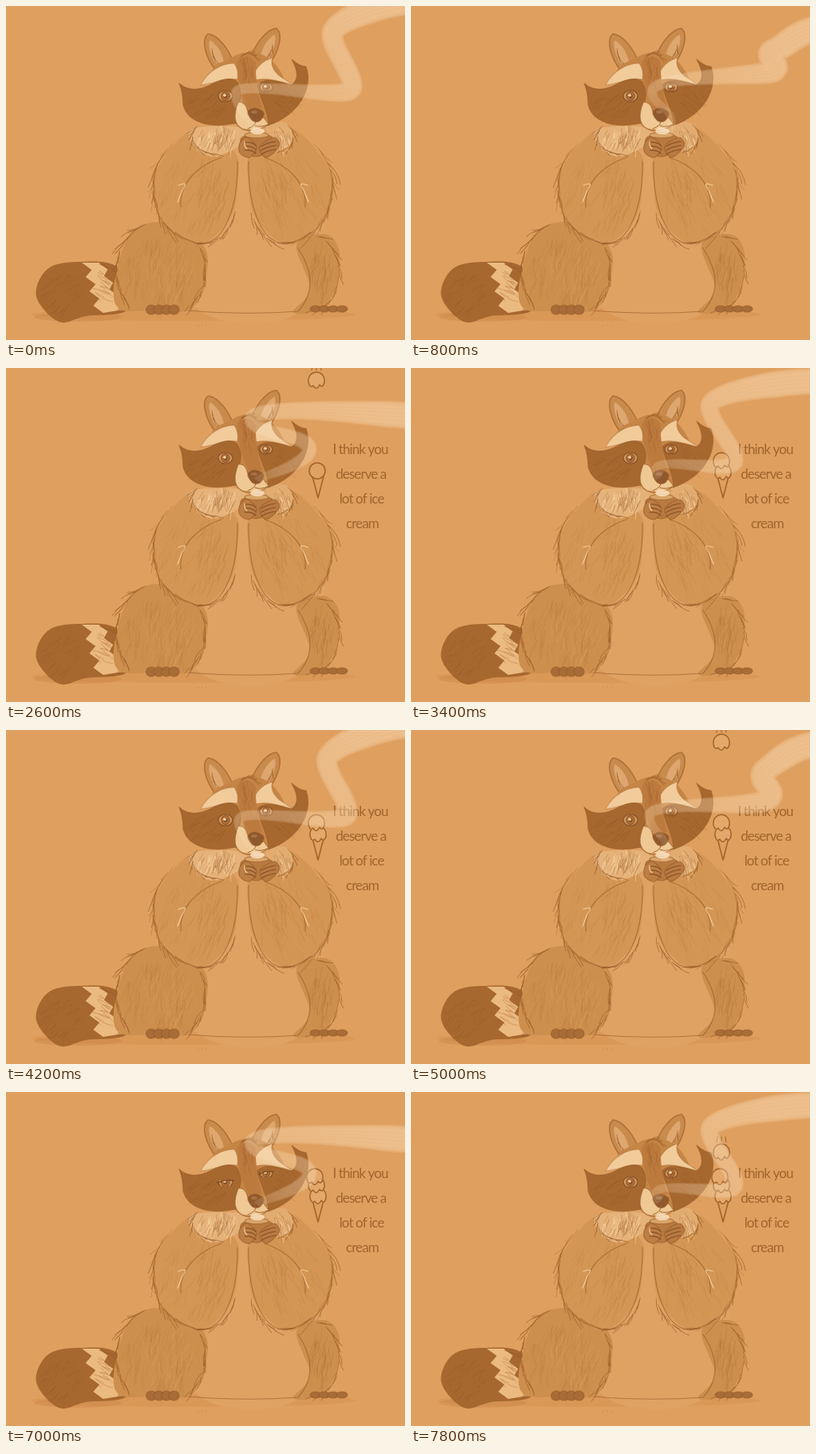
Animation of 500x419 px, one loop 8000 ms. Source, as an HTML page with a canvas:

```html
<!DOCTYPE html>
<html lang="en">
<head>
<meta charset="utf-8">
<title>Raccoon with a warm cup</title>
<style>
html, body { margin: 0; width: 100%; height: 100%; overflow: hidden; background: #df9f5e; }
canvas { display: block; width: 500px; height: 419px; }
</style>
</head>
<body>
<canvas id="stage" width="500" height="419"></canvas>
<script>
const stage = document.getElementById('stage');
const ctx = stage.getContext('2d');
const BG = '#df9f5e', INK = '#a1652d', LINE = 'rgba(154,92,40,.65)', SOFT = 'rgba(154,92,40,.35)';
const DARK = '#a7682f', PALE = '#f1cb9a', ARM = '#d49654', LEG = '#cd8f4d', BELLY = '#dfa263';
const STEP = 200, LOOP = 8000, CYCLE = 22;

let seed = 7;
const rnd = () => (seed = (seed * 16807) % 2147483647) / 2147483647;
const spread = r => (rnd() * 2 - 1) * r;
const clamp = v => Math.max(0, Math.min(1, v));
const mix = (a, b, u) => a + (b - a) * u;

function paint(c, fill, line, width = 1.2, path) {
  const extra = path ? [path] : [];
  if (fill) { c.fillStyle = fill; c.fill(...extra); }
  if (line) { c.strokeStyle = line; c.lineWidth = width; c.stroke(...extra); }
}

const shape = (c, d, fill, line, width) => paint(c, fill, line, width, new Path2D(d));

function oval(c, x, y, rx, ry, fill, line, width) {
  c.beginPath();
  c.ellipse(x, y, rx, ry, 0, 0, Math.PI * 2);
  paint(c, fill, line, width);
}

// smooth closed outline through a few x,y pairs
function blob(c, p, fill, line) {
  const n = p.length / 2;
  const at = i => [p[2 * ((i + n) % n)], p[2 * ((i + n) % n) + 1]];
  c.beginPath();
  c.moveTo(...at(0));
  for (let i = 0; i < n; i++) {
    const [a, b, d, e] = [-1, 0, 1, 2].map(k => at(i + k));
    c.bezierCurveTo(b[0] + (d[0] - a[0]) / 6, b[1] + (d[1] - a[1]) / 6,
      d[0] - (e[0] - b[0]) / 6, d[1] - (e[1] - b[1]) / 6, ...d);
  }
  paint(c, fill, line);
}

function hair(c, x, y, angle, len, color, width) {
  const dx = Math.cos(angle) * len, dy = Math.sin(angle) * len, bend = spread(.2);
  c.beginPath();
  c.moveTo(x, y);
  c.quadraticCurveTo(x + dx / 2 - dy * bend, y + dy / 2 + dx * bend, x + dx, y + dy);
  paint(c, null, color, width);
}

// loose hairs scattered inside an ellipse
function fur(c, x, y, rx, ry, n, angle, len, color) {
  for (let i = 0; i < n; i++) {
    const a = rnd() * 6.283, r = Math.sqrt(rnd());
    hair(c, x + Math.cos(a) * r * rx, y + Math.sin(a) * r * ry, angle + spread(.3), len * (.5 + rnd()), color, 1);
  }
}

// long hairs that follow an arc of an ellipse
function fringe(c, x, y, rx, ry, from, to, n, len, color = LINE) {
  const turn = Math.sign(to - from);
  for (let i = 0; i < n; i++) {
    const a = mix(from, to, (i + rnd()) / n);
    const tangent = Math.atan2(turn * ry * Math.cos(a), -turn * rx * Math.sin(a));
    hair(c, x + rx * Math.cos(a), y + ry * Math.sin(a), tangent + spread(.25), len * (.6 + rnd() * .8), color, 1);
  }
}

function mirrored(c, axis, dy, part) {
  part(c);
  c.save();
  c.translate(2 * axis, dy);
  c.scale(-1, 1);
  part(c);
  c.restore();
}

function toes(c, x, y, gap, rx, ry) {
  for (let i = 0; i < 4; i++) oval(c, x + i * gap, y, rx, ry, '#a86c38', LINE);
}

function drawTail(c) {
  blob(c, [38, 364, 52, 330, 90, 321, 140, 328, 153, 380, 100, 389, 66, 396], DARK);
  c.beginPath();
  for (let i = 0; i < 8; i++) c.lineTo(95 + i * 2.4 + (i % 2) * 10, 322 + i * 9);
  for (let i = 7; i >= 0; i--) c.lineTo(116 + i * 3.4 + (i % 2) * 8, 322 + i * 8.4);
  paint(c, '#ebba80');
  fur(c, 72, 360, 25, 25, 45, 2.4, 10, 'rgba(132,78,34,.2)');
  fur(c, 118, 352, 9, 20, 20, .5, 10, 'rgba(170,106,50,.4)');
  fringe(c, 112, 360, 36, 36, -1.5, .6, 16, 9);
}

function drawArm(c) {
  blob(c, [240, 152, 193, 197, 184, 238, 207, 281, 246, 298, 282, 264, 290, 222, 287, 184], ARM);
  fur(c, 236, 232, 40, 46, 60, 2, 16, 'rgba(157,96,44,.12)');
  fur(c, 262, 225, 18, 42, 45, 1.9, 18, 'rgba(150,90,40,.14)');
  shape(c, 'M270 190 C240 200 217 222 219 252', null, LINE);
  shape(c, 'M290 195 C291 250 275 296 246 298 Q230 298 212 284', null, LINE);
  shape(c, 'M216 225 Q230 219 221 231 L215 246', null, PALE);
  fringe(c, 242, 228, 57, 68, 4.1, 2, 26, 18, SOFT);
  fringe(c, 242, 228, 58, 69, 3.7, 2.2, 9, 22);
  fringe(c, 248, 236, 42, 62, .3, 1.7, 12, 15);
}

function drawBody(c) {
  blob(c, [240, 155, 200, 240, 240, 380, 370, 382, 400, 240, 352, 157], BELLY);
  blob(c, [364, 300, 398, 286, 417, 305, 414, 350, 395, 380, 360, 384, 381, 355], LEG);
  fringe(c, 386, 335, 31, 46, -1.5, 1.3, 18, 15);
  fur(c, 397, 330, 14, 36, 40, 1.7, 18, 'rgba(157,96,44,.2)');
  toes(c, 388, 380, 11, 7, 4);
  shape(c, 'M228 382 Q300 388 366 383 Q396 350 366 304', null, LINE);
  blob(c, [141, 379, 137, 340, 160, 281, 212, 273, 250, 305, 248, 350, 230, 381, 185, 382], LEG);
  fur(c, 194, 328, 44, 42, 100, 1.8, 18, 'rgba(157,96,44,.14)');
  fur(c, 205, 330, 36, 38, 40, 1.8, 15, 'rgba(232,178,115,.2)');
  fringe(c, 194, 332, 56, 62, 4.4, 2.5, 24, 15);
  fringe(c, 194, 332, 56, 58, -.6, .9, 16, 15);
  toes(c, 182, 381, 9.5, 6.5, 6);
  mirrored(c, 297, 0, drawArm);
}

function drawRuff(c) {
  blob(c, [236, 153, 298, 153, 297, 172, 260, 189, 233, 172], '#e5b27a');
  blob(c, [326, 151, 351, 147, 360, 168, 338, 182], '#e2ac71');
  [[266, 27, 34, 1.8], [345, 10, 16, 1.2]].forEach(([x, rx, n, angle]) => {
    fur(c, x, 163, rx, 13, n, angle, 13, 'rgba(250,215,165,.5)');
    fur(c, x, 163, rx, 13, n, angle, 12, SOFT);
  });
  fringe(c, 265, 164, 31, 22, 3.9, 1.8, 14, 13);
  fringe(c, 340, 164, 20, 19, -1, 1.2, 10, 11);
}

function drawEar(c) {
  shape(c, 'M262 80 C250 64 244 42 253 35 C266 36 280 55 286 73', '#c98b4c', LINE, 1.5);
  shape(c, 'M264 76 C256 62 252 46 256 43 C267 51 271 60 273 70', '#dea770');
  fringe(c, 284, 54, 26, 24, 3.2, 2, 8, 9);
}

function drawHead(c) {
  mirrored(c, 296, -7, drawEar);
  blob(c, [258, 86, 280, 66, 306, 58, 335, 70, 350, 108, 314, 155, 284, 144], '#c58545');
  shape(c, 'M244 99 C255 78 274 72 286 72 Q292 80 290 92 C274 89 262 98 244 99', PALE, SOFT);
  shape(c, 'M309 89 Q316 70 334 65 Q330 77 343 88 L360 99 C340 94 325 88 309 94', PALE, SOFT);
  shape(c, 'M217 97 C228 107 243 106 258 98 S287 89 291 98 C300 116 287 125 288 147 C255 154 228 146 222 124 Q222 108 217 97', DARK, LINE);
  shape(c, 'M358 67 Q368 76 376 76 C385 103 368 136 328 150 C331 135 318 116 315 99 C326 87 348 98 358 99 Q371 90 358 67', DARK, LINE);
  fur(c, 256, 122, 24, 16, 30, 2.5, 13, 'rgba(132,76,33,.2)');
  fur(c, 349, 114, 16, 15, 20, .8, 12, 'rgba(132,76,33,.2)');
  shape(c, 'M289 70 Q303 56 313 71 Q312 100 321 128 L304 129 Q292 108 289 70', '#bd7a3d');
  fur(c, 304, 88, 7, 20, 20, -1.7, 10, 'rgba(145,84,38,.25)');
  fringe(c, 303, 72, 12, 12, 3.6, 5.6, 10, 8);
  shape(c, 'M291 121 Q300 119 303 132 Q309 145 323 140 L329 148 Q317 159 296 154 Q281 146 291 121', '#efc893', LINE);
  blob(c, [303, 133, 312, 128, 323, 134, 318, 144, 309, 144], '#8f582d', LINE);
  oval(c, 311, 133, 4, 2, 'rgba(225,172,120,.3)');
  shape(c, 'M313 145 Q313 150 303 154 M312 150 Q319 153 327 149', null, INK, 1);
}

function drawCup(c) {
  blob(c, [297, 164, 331, 163, 333, 178, 314, 189, 297, 180], '#b87a40', LINE);
  oval(c, 314, 162, 15, 3.5, '#d9a468', LINE);
  oval(c, 315, 157, 9, 4, 'rgba(255,233,205,.75)');
  blob(c, [293, 172, 302, 165, 314, 177, 305, 190, 293, 184], '#bd7e43', LINE);
  blob(c, [318, 176, 336, 165, 342, 176, 326, 190], '#b97a41', LINE);
  for (let i = 0; i < 3; i++) {
    shape(c, `M299 ${171 + i * 5} q9 -1 14 4 M338 ${170 + i * 5} q-10 1 -18 6`, null, '#86502a');
  }
  shape(c, 'M299 170 q-1 6 3 9', null, PALE);
}

function paintScene() {
  const layer = document.createElement('canvas');
  layer.width = 500;
  layer.height = 419;
  const c = layer.getContext('2d');
  c.lineCap = c.lineJoin = 'round';
  c.fillStyle = BG;
  c.fillRect(0, 0, 500, 419);
  oval(c, 235, 387, 203, 8, 'rgba(187,119,58,.17)');
  oval(c, 90, 390, 55, 6, 'rgba(175,105,48,.2)');
  for (let i = 0; i < 3; i++) oval(c, 241 + i * 5, 401 - i % 2, 1, .6, SOFT);
  [drawTail, drawBody, drawRuff, drawHead, drawCup].forEach(part => part(c));
  return layer;
}

function drawEye(x, y, r, squint) {
  ctx.save();
  if (squint) {
    ctx.beginPath();
    ctx.rect(x - 12, y - 2, 24, 7);
    ctx.clip();
  }
  oval(ctx, x, y, r + 2, r, '#cc955c', '#885028');
  oval(ctx, x, y, r * .72, r * .78, '#b97538', '#8c532a');
  oval(ctx, x, y, r * .4, r * .45, '#8d5229');
  oval(ctx, x - 1, y - 1, 2, 1.8, '#f5d2a4');
  ctx.restore();
  if (squint) shape(ctx, `M${x - r - 3} ${y + 1} Q${x} ${y - 4} ${x + r + 3} ${y - 2}`, null, '#7f4a23', 1.5);
}

// keys are [time, x, y]
function along(keys, t) {
  const i = Math.max(1, keys.findIndex(k => k[0] >= t));
  const a = keys[i - 1], b = keys[i], u = (t - a[0]) / (b[0] - a[0]);
  return [mix(a[1], b[1], u), mix(a[2], b[2], u)];
}

// bends are born at the cup, alternate left and right, and drift off to the right
const leftBend = [[-5, 306, 128], [0, 288, 110], [7, 313, 104], [13, 308, 64], [17, 374, 48], [22, 409, 36], [29, 490, 70]];
const rightBend = [[3, 320, 150], [7, 345, 132], [13, 380, 102], [17, 406, 116], [22, 434, 102], [29, 465, 68]];

function steamKnots(phase) {
  const bends = [];
  [leftBend, rightBend].forEach(keys => [-CYCLE, 0, CYCLE].forEach(shift => {
    const age = phase + shift;
    if (age < keys[0][0] || age > 28) return;
    const [x, y] = along(keys, age);
    const tilt = clamp((age - CYCLE) / 5) * Math.PI / 2;
    bends.push({ x, y, hx: 20 * Math.sin(tilt), hy: -20 * Math.cos(tilt), born: age - keys[0][0] });
  }));
  bends.sort((a, b) => a.born - b.born);
  const lift = phase < 18 ? 30 * clamp((phase - 9) / 8) : 0;
  const exitY = 34 - 42 * Math.cos((phase + 1) / CYCLE * 2 * Math.PI);
  return [{ x: 314, y: 156 - lift, hx: 0, hy: -4 }, ...bends, { x: 530, y: exitY, hx: 45, hy: 3 }];
}

function steamLine(phase) {
  const knots = steamKnots(phase), out = [];
  for (let i = 0; i < knots.length - 1; i++) {
    const a = knots[i], b = knots[i + 1];
    for (let u = 0; u < 1; u += .04) {
      const v = 1 - u;
      const bez = (p, h) => v * v * v * a[p] + 3 * v * v * u * (a[p] + a[h]) + 3 * v * u * u * (b[p] - b[h]) + u * u * u * b[p];
      out.push([bez('x', 'hx'), bez('y', 'hy')]);
    }
  }
  return out;
}

function steamInk(scale) {
  const g = ctx.createRadialGradient(311, 142, 0, 311, 142, 180);
  [[0, .08], [.2, .24], [.5, .33], [1, .46]].forEach(([at, a]) => g.addColorStop(at, `rgba(255,230,198,${a * scale})`));
  return g;
}

function drawSteam(phase) {
  const line = steamLine(phase);
  const ribs = line.map(([x, y], i) => {
    const a = line[Math.max(0, i - 1)], b = line[Math.min(line.length - 1, i + 1)];
    const dx = b[0] - a[0], dy = b[1] - a[1], len = Math.hypot(dx, dy) || 1;
    const half = 4 + 12 * clamp(Math.hypot(x - 310, y - 142) / 190);
    return [x, y, -dy / len * half, dx / len * half];
  });
  const side = f => ribs.map(([x, y, nx, ny]) => [x + nx * f, y + ny * f]);
  const run = list => list.forEach(([x, y]) => ctx.lineTo(x, y));
  // nested ribbons soften the edge
  [1.08, .96, .82].forEach(f => {
    ctx.beginPath();
    run(side(f));
    run(side(-f).reverse());
    paint(ctx, steamInk(.36));
  });
  for (let k = -3; k <= 3; k++) {
    ctx.beginPath();
    run(side(k * .3));
    paint(ctx, null, steamInk(.16), 2);
  }
}

function scoop(x, y) {
  shape(ctx, `M${x - 10} ${y + 3} C${x - 12} ${y - 14} ${x + 12} ${y - 14} ${x + 10} ${y + 3}
    q-2 8 -6 3 q-4 8 -8 1 q-4 4 -6 -4`, '#e3a86a', INK, 1.5);
}

function drawCone(frame) {
  ctx.globalAlpha = clamp((frame - 4) / 4);
  shape(ctx, 'M384 136 L391 163 L398 136', null, INK, 1.6);
  if (frame < 16) oval(ctx, 390, 129, 10, 10, '#e0a261', INK, 1.6);
  else scoop(391, 130);
  for (let k = 0; k < 3; k++) {
    const age = frame - 13 - 12 * k;
    if (age < 0) break;
    if (age > 2) {
      scoop(389 - k * 2, 116 - 10 * k);
      continue;
    }
    const y = 15 + 20 * age + 5 * age * age;
    scoop(389, y);
    for (let i = -1; i < 2; i++) shape(ctx, `M${389 + i * 6} ${y - 12} l${-i} -7`, null, INK, 1);
  }
  ctx.globalAlpha = 1;
}

function drawText(frame) {
  ctx.globalAlpha = clamp((frame - 6) / 3);
  ctx.fillStyle = INK;
  ctx.font = '17px Lato, sans-serif';
  ctx.letterSpacing = '-0.9px';
  ctx.textAlign = 'center';
  ['I think you', 'deserve a', 'lot of ice', 'cream'].forEach((s, i) => ctx.fillText(s, 444 + i * .8, 108 + i * 31));
  ctx.globalAlpha = 1;
}

const scene = paintScene();
const start = performance.now();

function draw(now) {
  const frame = Math.floor(Math.max(0, now - start) % LOOP / STEP);
  const squint = frame > 31 && frame < 36;
  ctx.lineCap = ctx.lineJoin = 'round';
  ctx.drawImage(scene, 0, 0);
  drawEye(275, 113, 7, squint);
  drawEye(326, 102, 6, squint);
  drawText(frame);
  drawCone(frame);
  drawSteam(frame % CYCLE);
  requestAnimationFrame(draw);
}
draw(start);
</script>
</body>
</html>
```
